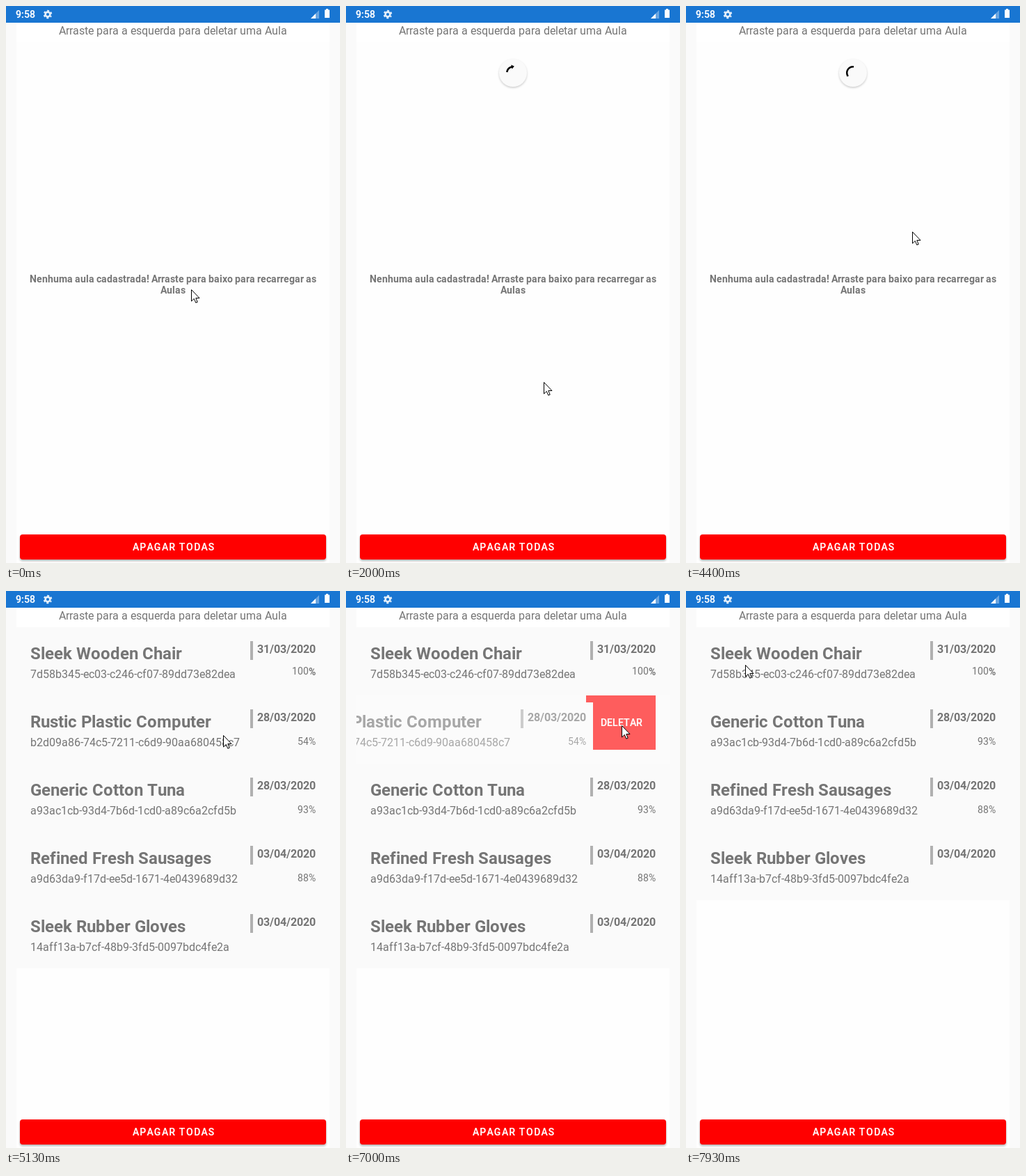
These frames come from a looping animation (480x800 px, 8000 ms). An HTML page:

```html
<!DOCTYPE html>
<html lang="pt">
<head>
<meta charset="utf-8">
<title>Aulas</title>
<style>
  html, body { margin: 0; width: 100%; height: 100%; overflow: hidden; background: #fafafa; }
  svg { display: block; width: 100%; height: 100%; }
  text { font-family: Roboto, "Noto Sans", sans-serif; font-size: 16px; fill: #757575; white-space: pre; }
  .mid { text-anchor: middle; }
  .end { text-anchor: end; }
  .small { font-size: 14px; }
  .medium { font-weight: 500; }
  .bold { font-weight: 700; }
  .title { font-size: 24px; font-weight: 700; }
  .white { fill: #fff; stroke: #fff; stroke-width: .2; }
</style>
</head>
<body>
<svg viewBox="0 0 480 800" preserveAspectRatio="none">
  <defs>
    <clipPath id="listClip"><rect x="15" y="52" width="450" height="700"/></clipPath>
    <clipPath id="titleClip"><rect x="0" y="0" width="480" height="50"/></clipPath>
    <filter id="soft" x="-30%" y="-30%" width="160%" height="160%"><feGaussianBlur stdDeviation="1.6"/></filter>
  </defs>

  <rect width="480" height="800" fill="#fafafa"/>
  <rect x="15" y="24" width="450" height="776" fill="#fefefe"/>
  <rect x="15" y="24" width="450" height="28" fill="#fff"/>
  <text class="mid" x="240" y="41">Arraste para a esquerda para deletar uma Aula</text>

  <g id="empty">
    <text class="small bold mid" x="240" y="397">Nenhuma aula cadastrada! Arraste para baixo para recarregar as</text>
    <text class="small bold mid" x="240" y="413">Aulas</text>
  </g>
  <g id="list" clip-path="url(#listClip)"></g>

  <g id="spinner">
    <circle cy="1.5" r="20" fill="#000" opacity=".2" filter="url(#soft)"/>
    <circle r="20" fill="#fafafa"/>
    <path id="ring" fill="none" stroke="#000" stroke-width="2.5" stroke-linecap="square"/>
    <path id="arrow" d="M5.75 0H11.75L8.75 4Z"/>
  </g>

  <rect x="20" y="761" width="440" height="36" rx="4" opacity=".3" filter="url(#soft)"/>
  <rect x="20" y="759" width="440" height="36" rx="4" fill="#f00"/>
  <text class="small medium white mid" x="240.6" y="782" letter-spacing="1.25">APAGAR TODAS</text>

  <rect width="480" height="24" fill="#1976d2"/>
  <text class="small medium white" x="14" y="17">9:58</text>
  <g transform="translate(60 12)" fill="none" stroke="#e8f1fa">
    <circle r="3.4" stroke-width="2.6"/>
    <circle r="5.3" stroke-width="2" stroke-dasharray="2.8 2.75" stroke-dashoffset="1.4" transform="rotate(30)"/>
  </g>
  <path d="M438 18L450 6V18Z" fill="#fff" opacity=".35"/>
  <path d="M438 18L445 11V18Z" fill="#fff"/>
  <path d="M460 4h3v1.5h2v11.5h-7v-11.5h2Z" fill="#fff"/>

  <path id="cursor" d="M.5 .5V17L4.3 13.4L6.8 19.2L9.2 18.2L6.8 12.5H12Z" fill="#fff" stroke="#000" stroke-linejoin="round"/>
</svg>

<script>
const LOOP = 8000, TICK = 1000 / 15, PITCH = 98;
const LIST_SHOWN = 4700;
const FADE_START = 6950, MOVE_START = 7085, MOVE_TIME = 250;

const $ = id => document.getElementById(id);
const clamp = v => Math.min(1, Math.max(0, v));
const show = (node, on) => node.setAttribute('visibility', on ? 'visible' : 'hidden');

// ---- lesson rows: title, id, date, score
const lessons = [
  ['Sleek Wooden Chair', '7d58b345-ec03-c246-cf07-89dd73e82dea', '31/03/2020', '100%'],
  ['Rustic Plastic Computer', 'b2d09a86-74c5-7211-c6d9-90aa680458c7', '28/03/2020', '54%'],
  ['Generic Cotton Tuna', 'a93ac1cb-93d4-7b6d-1cd0-a89c6a2cfd5b', '28/03/2020', '93%'],
  ['Refined Fresh Sausages', 'a9d63da9-f17d-ee5d-1671-4e0439689d32', '03/04/2020', '88%'],
  ['Sleek Rubber Gloves', '14aff13a-b7cf-48b9-3fd5-0097bdc4fe2a', '03/04/2020', '']
];

function rowMarkup([title, id, date, score], i) {
  const scoreText = score === '100%'
    ? '<text class="small end" x="435" y="68">100</text><text class="small bold end" x="445" y="69">%</text>'
    : `<text class="small end" x="445" y="71">${score}</text>`;
  const action = i === 1
    ? `<rect class="action" y="0" height="78" fill="#f00"/>
       <text class="small medium white mid" x="395.5" y="44">DELETAR</text>`
    : '';
  return `<g class="row">
    <rect x="15" width="450" height="${PITCH}" fill="#fafafa"/>${action}
    <g class="front">
      <rect x="15" y="10" width="440" height="88" fill="#fafafa"/>
      <g clip-path="url(#titleClip)"><text class="title" x="35" y="46">${title}</text></g>
      <text x="35" y="73">${id}</text>
      <rect x="351" y="20" width="4" height="27" fill="#b0b0b0"/>
      <text class="bold end" x="445" y="37">${date}</text>
      ${scoreText}
    </g>
  </g>`;
}

$('list').innerHTML = lessons.map(rowMarkup).join('');
const rows = [...document.querySelectorAll('.row')];
const front = rows[1].querySelector('.front');
const action = rows[1].querySelector('.action');
const actionLabel = action.nextElementSibling;

// Low-density screens advance each glyph by whole pixels.
const pen = document.createElement('canvas').getContext('2d');
function snapGlyphs(node) {
  const style = getComputedStyle(node);
  const spacing = parseFloat(style.letterSpacing) || 0;
  const share = { start: 0, middle: .5, end: 1 }[style.textAnchor];
  pen.font = `${style.fontWeight} ${style.fontSize} ${style.fontFamily}`;
  let width = 0;
  const offsets = [...node.textContent].map(glyph => {
    const at = width;
    width += Math.round(pen.measureText(glyph).width) + spacing;
    return at;
  });
  const start = Math.round(node.getAttribute('x') - width * share);
  node.style.textAnchor = 'start';
  node.setAttribute('x', offsets.map(at => start + at).join(' '));
}
document.querySelectorAll('text').forEach(snapGlyphs);

// ---- pointer path: time, x, y
const path = [
  [0, 266, 407], [400, 258, 151], [870, 272, 552], [1070, 274, 564], [1200, 274, 564],
  [1730, 276, 543], [2200, 288, 538], [2600, 277, 527], [2870, 245, 502], [3470, 142, 413],
  [3600, 121, 400], [4400, 325, 324], [5200, 312, 205], [5270, 312, 205], [5600, 196, 222],
  [5867, 188, 208], [6133, 333, 192], [6333, 412, 183], [6467, 412, 183], [6667, 396, 193],
  [7000, 396, 193], [7200, 397, 195], [7330, 395, 195], [7800, 114, 124], [7933, 85, 106]
];
const slope = (i, c) => (path[i + 1][c] - path[i][c]) / (path[i + 1][0] - path[i][0]);

// Monotone tangents keep the pointer from overshooting its turning points.
function tangent(i, c) {
  if (i === 0 || i === path.length - 1) return 0;
  const a = slope(i - 1, c), b = slope(i, c);
  return a * b <= 0 ? 0 : 2 * a * b / (a + b);
}

function pointer(t, c) {
  const last = path.length - 1;
  if (t >= path[last][0]) return path[last][c];
  const i = path.findIndex(p => p[0] > t) - 1;
  const [p, q] = [path[i], path[i + 1]];
  const d = q[0] - p[0], u = (t - p[0]) / d, v = 1 - u;
  return p[c] * v * v * (1 + 2 * u) + q[c] * u * u * (3 - 2 * u)
    + d * u * v * (tangent(i, c) * v - tangent(i + 1, c) * u);
}

// ---- refresh spinner
const PULL_SHOWN = 800, RELEASE = 930, SPIN_READY = 1471, FINISH = 666, CYCLE = 1332;
const SPIN_START = SPIN_READY + FINISH;

// cubic-bezier(.4, 0, .2, 1)
function fastOutSlowIn(x) {
  let lo = 0, hi = 1;
  for (let i = 0; i < 24; i++) {
    const s = (lo + hi) / 2, r = 1 - s;
    if (1.2 * r * r * s + .6 * r * s * s + s ** 3 < x) lo = s; else hi = s;
  }
  return 3 * (1 - lo) * lo * lo + lo ** 3;
}

// Arc ends in degrees, clockwise from three o'clock.
function arcAt(t) {
  if (t < SPIN_START) {
    const u = clamp((t - SPIN_READY) / FINISH);
    const turn = .575 + .425 * u;
    return [(.79 * u + turn) * 360, (.8 + turn) * 360];
  }
  const n = (t - SPIN_START) / CYCLE, k = Math.floor(n), u = n - k;
  const base = .8 + .78 * k;
  let tail = base, head = base + .79;
  if (u < .5) head = base + .79 * fastOutSlowIn(u * 2) + .01;
  else tail = head - .79 * (1 - fastOutSlowIn(u * 2 - 1)) - .01;
  const turn = (1 + .21 * n) * 360 + 216 * n;
  return [tail * 360 + turn, head * 360 + turn];
}

function drawSpinner(t) {
  const scale = 1 - clamp((t - LIST_SHOWN) / 150);
  const visible = t >= PULL_SHOWN && scale > 0;
  show($('spinner'), visible);
  show($('arrow'), visible && t < SPIN_START);
  if (!visible) return;

  const rise = 1 - (1 - clamp((t - RELEASE) / (SPIN_READY - RELEASE))) ** 2;
  $('spinner').setAttribute('transform', `translate(240 ${169 - 73 * rise}) scale(${scale})`);

  const [tail, head] = arcAt(t);
  const point = a => [Math.cos(a * Math.PI / 180), Math.sin(a * Math.PI / 180)].map(v => (8.75 * v).toFixed(3)).join(' ');
  $('ring').setAttribute('d', `M${point(tail)}A8.75 8.75 0 ${head - tail > 180 ? 1 : 0} 1 ${point(head)}`);
  $('arrow').setAttribute('transform', `rotate(${head})`);
}

function drawList(t, x) {
  const shown = t >= LIST_SHOWN;
  show($('empty'), !shown);
  $('list').setAttribute('display', shown ? 'inline' : 'none');

  const drag = t < 5270 ? 0 : t < 5700 ? 100 * clamp((312 - x) / 100) : 100;
  front.setAttribute('transform', `translate(${-drag} 0)`);
  action.setAttribute('x', 445 - drag);
  action.setAttribute('width', drag);
  show(actionLabel, drag > 0);

  const lift = PITCH * (1 - Math.cos(Math.PI * clamp((t - MOVE_START) / MOVE_TIME))) / 2;
  rows.forEach((row, i) => row.setAttribute('transform', `translate(0 ${52 + PITCH * i - (i > 1 ? lift : 0)})`));
  rows[1].setAttribute('opacity', 1 - clamp((t - FADE_START) / (MOVE_START - FADE_START)));
}

function draw(ms) {
  const t = Math.floor((ms + 5) / TICK) * TICK;
  const x = pointer(t, 1), y = pointer(t, 2);
  drawList(t, x);
  drawSpinner(t);
  $('cursor').setAttribute('transform', `translate(${Math.round(x)} ${Math.round(y)})`);
}

const began = performance.now();
function loop() {
  draw((performance.now() - began) % LOOP);
  requestAnimationFrame(loop);
}
draw(0);
requestAnimationFrame(loop);
</script>
</body>
</html>
```
